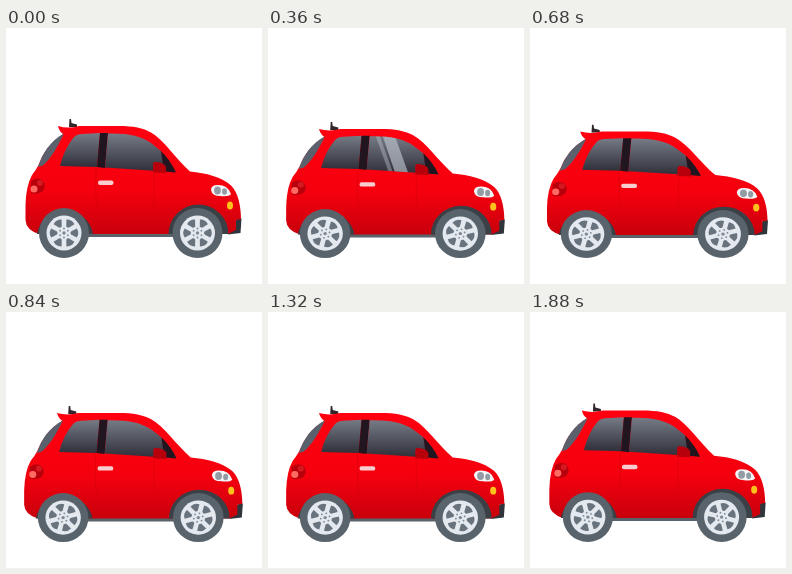
An HTML page that plays this animation: 256x256 px, repeating every 1.92 s.

```html
<!DOCTYPE html>
<html lang="en">
<head>
<meta charset="utf-8">
<title>Red car</title>
<style>
html, body { margin: 0; width: 100%; height: 100%; overflow: hidden; background: #fff; }
svg { display: block; width: 100vw; height: 100vh; }
</style>
</head>
<body>
<svg viewBox="0 0 256 256">
  <defs>
    <linearGradient id="glass" x1="0" y1="0" x2="0" y2="1">
      <stop offset="0" stop-color="#757b85"/>
      <stop offset="1" stop-color="#302f3a"/>
    </linearGradient>
    <linearGradient id="paint" x1="0" y1="0" x2="0" y2="1">
      <stop offset="0" stop-color="#ff0010"/>
      <stop offset=".6" stop-color="#f5000e"/>
      <stop offset="1" stop-color="#c8000c"/>
    </linearGradient>
    <path id="front" d="M102 105.5C122 105 135 108 145 115L155 123L159 143.5L99 139.5Z"/>
    <clipPath id="pane"><use href="#front"/></clipPath>
    <g id="wheel">
      <circle r="25" fill="#59636b"/>
      <circle r="17.5" fill="#e3e9ef"/>
      <g class="spin"></g>
      <circle r="1.7" fill="#7f8a94"/>
    </g>
  </defs>
  <g id="car">
    <path d="M63 99L63.5 91H65L65.5 95L71 96.5V99Z" fill="#30262c"/>
    <path d="M82 203H170V209H82Z" fill="#5a626a"/>
    <path d="M226 195L232 190.5H235.5L234.5 205L222 206.5Z" fill="#30343b"/>
    <path d="M52 98Q62 101 73 98H112C128 98 137 100 145 104.5C158 112 170 131 184 143.5C200 145 216 149 225 157.5C232 164 235 178 235 191L230 192V202L222 206H33Q20 202 19.5 192V177Q20 158 26 147Q30 142 32.5 137Q39 118 57 106Q53 103 52 98Z" fill="url(#paint)"/>
    <path d="M31 206A28.5 29 0 0 1 87 206ZM162.5 206A30 29.5 0 0 1 222.5 206Z" fill="#3b4047"/>
    <path d="M58 105.5C44 113 36 126 32 139L37 137.5C45 130 51 120 58 105.5Z" fill="#5b616c"/>
    <path d="M90 140V172Q91 194 108 194H148V145" fill="none" stroke="#d9000d" stroke-width=".7"/>
    <path d="M68 109Q71 106 76 106L94 105L91 139L54 138Q58 121 68 109Z" fill="url(#glass)"/>
    <path d="M94 105H102L99 140L91 139Z" fill="#21151f"/>
    <use href="#front" fill="url(#glass)"/>
    <g clip-path="url(#pane)">
      <g id="shine" fill="#c2c8d0">
        <path d="M105 102H117L133 148H120Z" opacity=".62"/>
        <path d="M98 102H102L118 148H114Z" opacity=".4"/>
      </g>
    </g>
    <path d="M155 123Q165 133 170 144.5L158 143.5Z" fill="#21151f"/>
    <path d="M148 134Q158 134 160 139V145L147 144.5V136Z" fill="#b8000d"/>
    <rect x="92" y="152.5" width="15.5" height="4.5" rx="2" fill="#f7cdd0"/>
    <path d="M25 153Q30 149 36 152Q41 157 37 163Q32 167 25 165Z" fill="#b8000d"/>
    <circle cx="34" cy="155" r="3" fill="#d51920"/>
    <circle cx="28" cy="161" r="3.5" fill="#ff6b62"/>
    <path d="M205 162Q205 157 212 157Q222 157 225 166Q223 169 214 168Q206 168 205 162Z" fill="#f4f6f8"/>
    <ellipse cx="211.5" cy="162.5" rx="3.4" ry="4" fill="#939ca5"/>
    <ellipse cx="218.5" cy="163.5" rx="2.5" ry="3.3" fill="#939ca5"/>
    <ellipse cx="224" cy="177.5" rx="3" ry="4" fill="#ffc21c"/>
    <use href="#wheel" x="58" y="205"/>
    <use href="#wheel" x="191.5" y="205"/>
  </g>
</svg>
<script>
const LOOP = 1920, STEP = 40, BOUNCE = 480, TURN = 960;
const car = document.getElementById("car");
const shine = document.getElementById("shine");
const spin = document.querySelector(".spin");
const clamp = v => Math.max(0, Math.min(1, v));

function addPath(d, fill, angle) {
  const path = document.createElementNS("http://www.w3.org/2000/svg", "path");
  path.setAttribute("d", d);
  path.setAttribute("fill", fill);
  path.setAttribute("transform", `rotate(${angle})`);
  spin.append(path);
}

// Six openings between the spokes, six bolts around the hub.
for (let i = 0; i < 6; i++) {
  addPath("M-1.4 -7L-4.6 -12.8Q0 -15.8 4.6 -12.8L1.4 -7Q0 -6 -1.4 -7Z", "#68737d", 30 + i * 60);
  addPath("M-.9 -4.5a.9 .9 0 1 0 1.8 0a.9 .9 0 1 0 -1.8 0Z", "#7f8a94", i * 60);
}

function draw(now) {
  const t = Math.floor((now % LOOP) / STEP) * STEP;
  // Squash towards the ground and back.
  const squash = (1 - Math.cos(t / BOUNCE * 2 * Math.PI)) / 2;
  car.setAttribute("transform",
    `translate(127.2 230.5) scale(${1 + 0.025 * squash} ${1 - 0.044 * squash}) translate(-127.2 -230.5)`);
  spin.setAttribute("transform", `rotate(${t / TURN * 360})`);
  shine.setAttribute("transform", `translate(${(t - 200) * 0.055} 0)`);
  shine.setAttribute("opacity", clamp((t - 80) / 100) * clamp((680 - t) / 140));
}

const start = performance.now();
function tick() {
  draw(performance.now() - start);
  requestAnimationFrame(tick);
}
draw(0);
requestAnimationFrame(tick);
</script>
</body>
</html>
```
